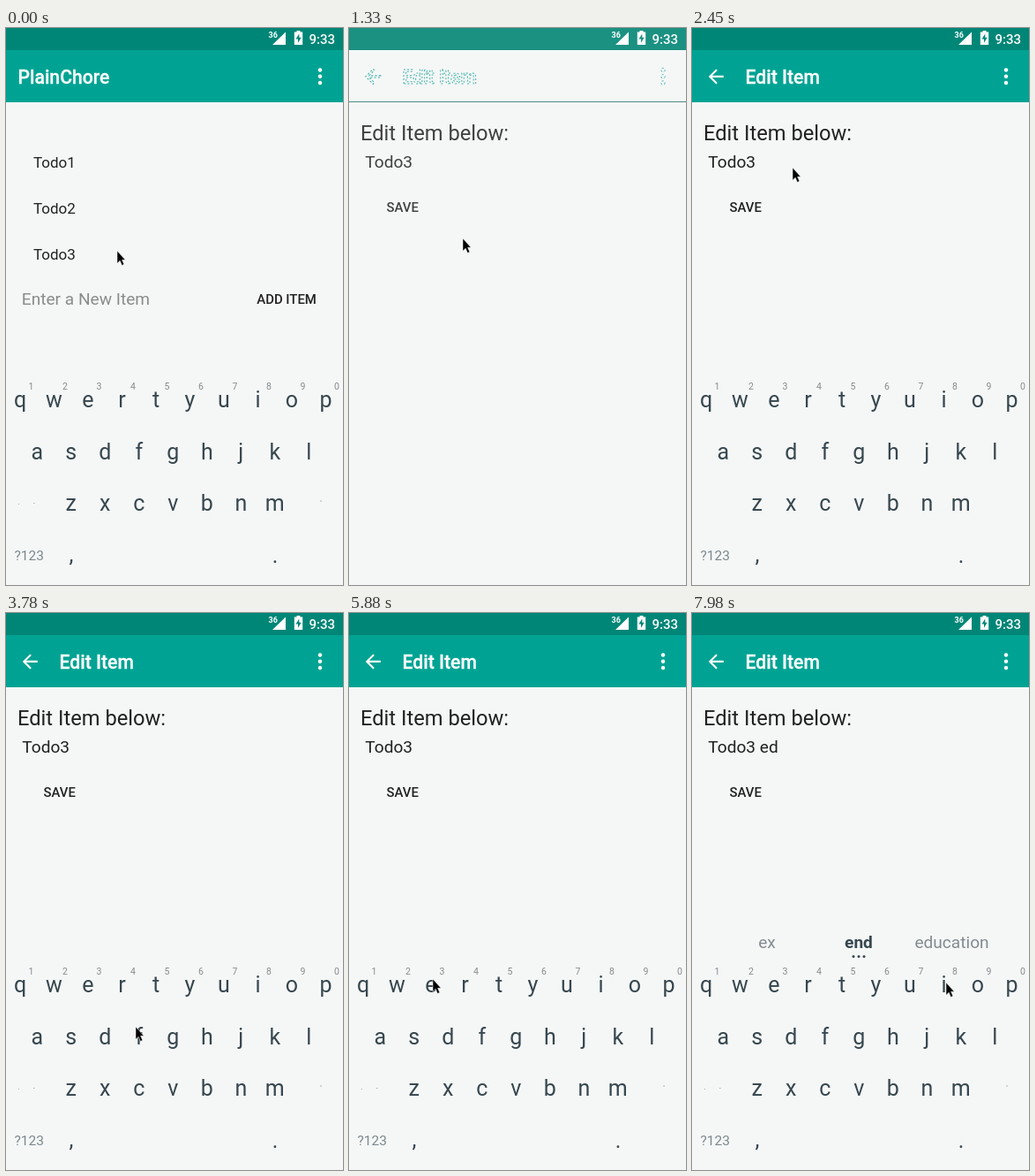
Recreate the animation shown at these times as an HTML page. Size 382x630 px, loop 8 s.

```html
<!DOCTYPE html>
<html lang="en">
<head>
<meta charset="utf-8">
<title>Todo list demo</title>
<style>
  html, body { margin: 0; width: 100%; height: 100%; overflow: hidden; background: #f5f7f7; }
  svg { display: block; width: 100%; height: 100%; }
  text { font-family: Roboto, "Noto Sans", sans-serif; fill: #212121; white-space: pre; }
  .title { font-size: 21.2px; font-weight: 500; fill: #fff; stroke: #fff; stroke-width: .3px; }
  .row { font-size: 17px; }
  .field { font-size: 19.1px; }
  .button { font-size: 14.9px; font-weight: 500; }
  .key { font-size: 25px; fill: #37474f; text-anchor: middle; }
  .digit { font-size: 10.5px; fill: #86898b; text-anchor: middle; }
  .word { font-size: 19.1px; fill: #838b8f; text-anchor: middle; }
  .strong { font-weight: 700; fill: #37474f; }
  .ghost .title, .ghost path, .ghost circle {
    fill: none; stroke: #3fb3a6; stroke-width: 1px; stroke-dasharray: 2 2;
  }
</style>
</head>
<body>
<svg viewBox="0 0 382 630" preserveAspectRatio="none">
  <rect width="382" height="630" fill="#f5f7f7"/>
  <rect id="status" width="382" height="25" fill="#008677"/>
  <rect id="bar" y="25" width="382" height="59" fill="#00a393"/>
  <rect id="barLine" y="83" width="382" height="1" fill="#4f8a84"/>

  <g fill="#fff">
    <path d="M317 4.5V19H302Z"/>
    <rect x="296" y="3" width="13" height="8.5" id="netBack" fill="#008677"/>
    <text x="297.5" y="11" style="font-size:9px;font-weight:700;fill:#fff">36</text>
    <path d="M329.5 3h4v1.5h2.7V19h-9.4V4.500h2.700Z"/>
    <path id="bolt" d="M332.3 6.500l-3.800 6h2.500v4.200l3.700-6h-2.400Z" fill="#008677"/>
    <text x="343.500" y="17.500" style="font-size:15px;font-weight:500;fill:#fff">9:33</text>
  </g>

  <g id="barItems" fill="#fff">
    <circle cx="356" cy="47.500" r="2.200"/>
    <circle cx="356" cy="54.800" r="2.200"/>
    <circle cx="356" cy="62" r="2.200"/>
    <text id="listTitle" class="title" x="13.500" y="63">PlainChore</text>
    <g id="editTitle">
      <path transform="translate(14.600 42.200) scale(1.060)"
        d="M20 11H7.830l5.590-5.590L12 4l-8 8 8 8 1.410-1.410L7.830 13H20z"/>
      <text class="title" x="60.500" y="63">Edit Item</text>
    </g>
  </g>

  <g id="listView">
    <text class="row" x="31" y="157.500">Todo1</text>
    <text class="row" x="31" y="209.500">Todo2</text>
    <text class="row" x="31" y="261.500">Todo3</text>
    <text class="field" x="17.800" y="312.500" style="fill:#8a8c8c">Enter a New Item</text>
    <text class="button" x="284.300" y="312">ADD ITEM</text>
  </g>

  <g id="editView">
    <text x="13" y="126.500" style="font-size:23.700px">Edit Item below:</text>
    <text id="entry" class="field" x="18.300" y="157.500"></text>
    <rect id="underline" x="77" y="159" width="10" height="1" fill="#212121"/>
    <text class="button" x="42.500" y="208.300">SAVE</text>
  </g>

  <g id="keyboard">
    <g id="keys"></g>
    <text x="9.500" y="602" style="font-size:15.500px;fill:#7d878c">?123</text>
    <g id="specks" fill="#a9b0b2">
      <rect x="14" y="538" width="1" height="1"/>
      <rect x="31" y="537" width="1.500" height="1"/>
      <rect x="356" y="534.500" width="2" height="1"/>
    </g>
    <g id="words">
      <text class="word" x="85" y="378.500"></text>
      <text class="word" x="189" y="378.500"></text>
      <text class="word" x="294.500" y="378.500"></text>
      <g fill="#37474f">
        <circle cx="183" cy="388.500" r="1.500"/>
        <circle cx="189" cy="388.500" r="1.500"/>
        <circle cx="195" cy="388.500" r="1.500"/>
      </g>
    </g>
    <g id="preview">
      <rect x="-28" y="-32" width="56" height="104" fill="#f5f7f7"/>
      <text class="key" style="font-size:35px"></text>
    </g>
  </g>

  <path id="pointer" d="M0 0V14.200L3.200 11.200L5.400 16.400L7.800 15.300L5.600 10.300H9.300Z"
    fill="#000" stroke="#fff" stroke-width=".5"/>
</svg>

<script>
const LOOP = 8000, STEP = 70;
const $ = id => document.getElementById(id);
const show = (id, on) => { $(id).style.display = on ? '' : 'none'; };
const within = (t, a, b) => t >= a && t < b;
const ramp = (t, a, b) => Math.min(1, Math.max(0, (t - a) / (b - a)));
const ease = p => p * p * (3 - 2 * p);

function addText(cls, x, y, label) {
  const el = document.createElementNS('http://www.w3.org/2000/svg', 'text');
  el.setAttribute('class', cls);
  el.setAttribute('x', x);
  el.setAttribute('y', y);
  el.textContent = label;
  $('keys').append(el);
}

// Each row: letters, first centre, baseline
[['qwertyuiop', 16, 429], ['asdfghjkl', 35.3, 488], ['zxcvbnm', 73.8, 546]]
  .forEach(([letters, x, y], row) => [...letters].forEach((letter, i) => {
    const cx = x + i * 38.5;
    addText('key', cx, y, letter);
    if (!row) addText('digit', cx + 12.4, 408.5, (i + 1) % 10);
  }));
addText('key', 74, 604, ',');
addText('key', 305, 605, '.');

// Pointer tip: time, x, y
const path = [
  [0, 126, 252], [840, 127, 251], [1330, 129, 238], [1680, 127, 215],
  [2100, 115, 160], [2450, 114, 158], [2520, 118, 172], [2800, 148, 443],
  [2940, 148, 445], [3780, 147, 468], [4200, 148, 490], [4550, 156, 555],
  [4970, 170, 584], [5110, 170, 584], [5740, 95, 416], [5880, 95, 414],
  [6370, 95, 414], [6790, 117, 480], [7210, 117, 480], [7980, 288, 418]
];

function pointerAt(t) {
  let i = 1;
  while (i < path.length - 1 && t > path[i][0]) i++;
  const [a, ax, ay] = path[i - 1], [b, bx, by] = path[i];
  const p = ease(ramp(t, a, b));
  return [ax + (bx - ax) * p, ay + (by - ay) * p];
}

function setWords(list, strong) {
  show('words', list.length);
  document.querySelectorAll('.word').forEach((el, i) => {
    el.textContent = list[i] || '';
    el.classList.toggle('strong', strong && i === 1);
  });
}

function setPreview(letter, x, y) {
  show('preview', letter);
  $('preview').setAttribute('transform', `translate(${x} ${y})`);
  $('preview').lastElementChild.textContent = letter;
}

function draw(time) {
  const t = Math.floor(time / STEP) * STEP;
  const editing = t >= 1190;
  const opening = within(t, 1190, 1400);
  const typedE = t >= 6090, typedD = t >= 6930;

  show('listView', !editing);
  show('listTitle', !editing);
  show('editView', editing);
  show('editTitle', editing);
  $('editView').setAttribute('opacity', 0.4 + 0.6 * ramp(t, 1120, 1400));

  const statusColor = opening ? '#1b9182' : '#008677';
  ['status', 'netBack', 'bolt'].forEach(id => $(id).setAttribute('fill', statusColor));
  show('bar', !opening);
  show('barLine', opening);
  $('barItems').setAttribute('class', opening ? 'ghost' : '');

  $('entry').textContent = 'Todo3' + (typedD ? ' ed' : typedE ? ' e' : '');
  show('underline', typedE && !typedD);

  const rise = ramp(t, 2030, 2170);
  show('keyboard', t < 1120 || t >= 2100);
  $('keyboard').setAttribute('opacity', editing ? rise : 1);
  $('keyboard').setAttribute('transform', `translate(0 ${editing ? 2 * (1 - rise) : 0})`);
  show('specks', t < 1120 || t >= 2940);

  if (typedD) setWords(['ex', 'end', 'education'], true);
  else setWords(typedE ? ['we', 'he', 'end'] : [], false);

  if (within(t, 6090, 6230)) setPreview('e', 93, 367);
  else if (within(t, 6860, 7000)) setPreview('d', 112.3, 426);
  else setPreview('', 0, 0);

  const [x, y] = pointerAt(t);
  $('pointer').setAttribute('transform', `translate(${Math.round(x)} ${Math.round(y)})`);
}

const start = performance.now();
function tick() {
  draw((performance.now() - start) % LOOP);
  requestAnimationFrame(tick);
}
tick();
</script>
</body>
</html>
```
